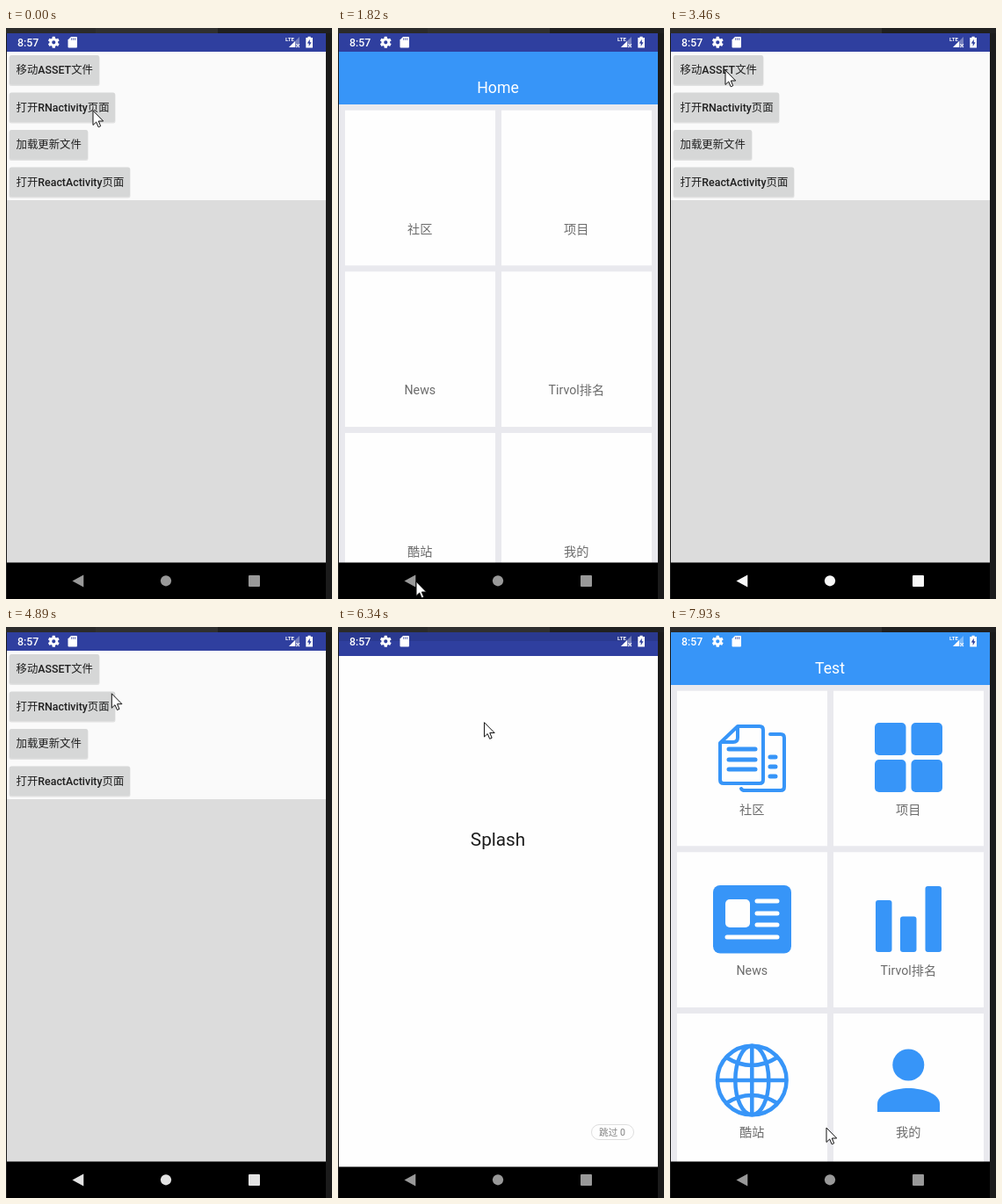
An HTML page with a canvas for the animation above (8000 ms loop, 371x650 px).

```html
<!DOCTYPE html>
<html lang="zh">
<head>
<meta charset="utf-8">
<title>Phone demo</title>
<style>
html, body { margin: 0; width: 100%; height: 100%; overflow: hidden; background: #1c1c1c; }
canvas { display: block; width: 371px; height: 650px; }
</style>
</head>
<body>
<canvas id="stage"></canvas>
<script>
const W = 371, H = 650, LOOP = 8000;
const BLUE = '#3795f8', INDIGO = '#2f3f9f';
const FONT = 'Roboto, "Noto Sans CJK SC", "Noto Sans CJK", sans-serif';
const canvas = document.getElementById('stage');
const g = canvas.getContext('2d');
const ratio = window.devicePixelRatio || 1;
canvas.width = W * ratio;
canvas.height = H * ratio;

const TICKS = [0, 120, 270, 390, 510, 660, 780, 910, 1060, 1180, 1300, 1420, 1540, 1690, 1820,
  2400, 2520, 2640, 2790, 2940, 3070, 3220, 3340, 3460, 3870, 3990, 4110, 4500, 4620, 4770,
  4890, 5020, 5140, 5290, 5560, 5710, 5830, 5950, 6100, 6220, 6340, 6490, 6620, 6770, 6890,
  7020, 7170, 7300, 7450, 7570, 7690, 7810, 7930];

// Each row: time, then values; linear between rows.
const POINTER = [[0, 99, 94], [270, 108, 101], [390, 165, 160], [510, 230, 240], [660, 233, 274],
  [1060, 233, 274], [1180, 225, 330], [1300, 190, 430], [1420, 140, 530], [1540, 108, 592],
  [1690, 93, 626], [1820, 89, 630], [2640, 89, 630], [2790, 92, 609], [2940, 125, 330],
  [3070, 136, 115], [3220, 100, 85], [3340, 72, 58], [3460, 63, 48], [4110, 63, 48],
  [4500, 85, 52], [4620, 124, 59], [4770, 128, 68], [5020, 112, 84], [5140, 104, 87],
  [5290, 100, 90], [5830, 100, 90], [5950, 135, 91], [6100, 156, 87], [6490, 173, 122],
  [6620, 173, 122], [6890, 210, 185], [7020, 230, 224], [7170, 235, 221], [7300, 235, 232],
  [7570, 215, 360], [7810, 183, 535], [7930, 178, 570]];
const NAV_LIGHT = [[2399, 153], [2400, 255], [4770, 240], [5560, 153]];
const NAV_RIPPLE = [[2399, 0], [2400, .22], [2640, .12], [2790, 0]];
const PRESS = [
  [[3860, 0], [3870, .07], [3990, .1], [4110, 0]],
  [[0, 0], [120, .08], [270, .1], [390, .05], [510, 0], [5700, 0], [5710, .08], [5830, .1], [5950, 0]]
];

// Window motion rows: time, shift of lower page, shift of upper page, top of its clip.
const OPEN_A = [[660, -7, 13, 87], [780, -13, 4, 7], [910, -13, 0, 6]];
const CLOSE = [[2520, -13, 0, 6], [2640, -12, 6, 50], [2790, -4, 24, 560], [2940, -1, 26, H], [3070, 0, 26, H]];
const OPEN_B = [[6100, 0, 26, 640], [6220, -5, 18, 240], [6340, -11, 6, 16], [6490, -13, 1, 6], [6620, -13, 0, 6]];

function at(rows, t) {
  if (t <= rows[0][0]) return rows[0].slice(1);
  for (let i = 1; i < rows.length; i++) {
    if (t > rows[i][0]) continue;
    const a = rows[i - 1], b = rows[i], k = (t - a[0]) / (b[0] - a[0]);
    return a.slice(1).map((v, j) => v + (b[j + 1] - v) * k);
  }
  return rows[rows.length - 1].slice(1);
}

function rect(x1, y1, x2, y2, fill, r = 0) {
  g.fillStyle = fill;
  g.beginPath();
  g.roundRect(x1, y1, x2 - x1, y2 - y1, r);
  g.fill();
}
function disc(x, y, r, fill) {
  g.fillStyle = fill;
  g.beginPath();
  g.arc(x, y, r, 0, 7);
  g.fill();
}
function shape(d, fill) {
  g.fillStyle = fill;
  g.fill(new Path2D(d));
}
function line(d, color, width) {
  g.strokeStyle = color;
  g.lineWidth = width;
  g.lineCap = g.lineJoin = 'round';
  g.stroke(new Path2D(d));
}
// y is the middle of the capitals
function text(s, x, y, size, color, align = 'center', weight = 400) {
  g.font = `${weight} ${size}px ${FONT}`;
  g.fillStyle = color;
  g.textAlign = align;
  g.fillText(s, x, y + size * .355);
}

const BUTTONS = [['移动ASSET文件', 106], ['打开RNactivity页面', 124], ['加载更新文件', 93], ['打开ReactActivity页面', 141]];

function button([label, right], i, t) {
  const y = 31 + i * 42.5;
  const press = PRESS[i] ? at(PRESS[i], t)[0] : 0;
  rect(3.5, y + .5, right + .5, y + 35, 'rgba(0,0,0,.1)', 2.5);
  rect(4, y, right, y + 33.5, '#d6d7d7', 2);
  if (press > 0) rect(4, y, right, y + 33.5, `rgba(0,0,0,${press})`, 2);
  let x = 11.5;
  for (const run of label.match(/[A-Za-z]+|[^A-Za-z]+/g)) {
    text(run, x, y + 17, 12.4, '#1f1f1f', 'left', /[A-Z]/i.test(run) ? 500 : 400);
    x += g.measureText(run).width;
  }
}

function home(t) {
  rect(1, 6, 364, 27, INDIGO);
  rect(1, 27, 364, 196, '#fafafa');
  rect(1, 196, 364, 609, '#dcdcdc');
  BUTTONS.forEach((b, i) => button(b, i, t));
}

function splash() {
  rect(1, 6, 364, 27, INDIGO);
  rect(1, 27, 364, 609, '#fefefe');
  text('Splash', 182, 236, 20.7, '#1c1c1c');
  g.strokeStyle = '#dedede';
  g.lineWidth = 1;
  g.beginPath();
  g.roundRect(288.5, 560.5, 48, 17, 8.5);
  g.stroke();
  text('跳过 0', 312, 569, 10.6, '#808080');
}

const ICONS = [
  () => {
    line('M57 132L77 113H102Q106 113 106 117V174Q106 178 102 178H61Q57 178 57 174ZM77 114V126Q77 131 72 131H58', BLUE, 4);
    line('M67 139H97M67 151H97M67 162H97M114 148H120M114 159H120M114 170H120', BLUE, 5);
    line('M114 122H126Q130 122 130 126V182Q130 186 126 186H85Q82 186 81 184', BLUE, 4);
  },
  () => {
    for (const x of [233, 274.5]) for (const y of [109, 151]) rect(x, y, x + 35.5, y + 37, BLUE, 5);
  },
  () => {
    rect(49, 294, 138, 371.5, BLUE, 8);
    rect(63, 310, 91, 342, '#fefefe', 5);
    line('M99 312H122M99 326H122M99 339H122M65 353H122', '#fefefe', 5);
  },
  () => {
    for (const [x, y] of [[234, 311], [262, 329.5], [290.5, 295]]) rect(x, y, x + 18.5, 370, BLUE, 3);
  },
  () => {
    g.strokeStyle = BLUE;
    g.lineWidth = 4.5;
    for (const rx of [39.3, 19]) {
      g.beginPath();
      g.ellipse(93.3, 516, rx, 39.3, 0, 0, 7);
      g.stroke();
    }
    line('M93.3 477V555M54 516H132M64 490Q93 508 122 490M64 542Q93 524 122 542', BLUE, 4.5);
  },
  () => {
    disc(271.3, 498.5, 18, BLUE);
    shape('M236 552V543C236 531 256 525 271.5 525S307 531 307 543V552Z', BLUE);
  }
];
const LABELS = ['社区', '项目', 'News', 'Tirvol排名', '酷站', '我的'];

function grid(top, title, icons) {
  rect(1, 6, 364, 27, INDIGO);
  rect(1, top, 364, 609, '#e9e9ee');
  rect(1, top, 364, top + 60, BLUE);
  text(title, 182, top + 41, 17.7, '#fff');
  LABELS.forEach((label, i) => {
    const x = i % 2 ? 186 : 8, y = top + 66.7 + (i >> 1) * 183.6;
    rect(x, y, x + 171, y + 176.6, '#fefefe');
    text(label, x + 85.3, y + 134.8, 14.2, '#6c6c6c');
  });
  if (icons) ICONS.forEach(draw => draw());
}
const homeGrid = () => grid(27, 'Home', false);
const testGrid = t => grid(6, 'Test', t >= 7450);

// start, lower page, upper page, motion
const SCENES = [
  [0, home], [660, home, splash, OPEN_A], [1060, homeGrid], [2520, home, homeGrid, CLOSE],
  [3070, home], [6100, home, splash, OPEN_B], [7300, testGrid]
];

function page(draw, t, shift, clip) {
  g.save();
  g.beginPath();
  g.rect(1, clip, 363, H - clip);
  g.clip();
  g.translate(0, shift);
  draw(t);
  rect(1, 608.5, 364, 700, '#000');
  g.restore();
}

function statusIcons() {
  const w = '#fff';
  text('8:57', 13, 16.7, 12.4, w, 'left', 500);
  g.save();
  g.translate(54.3, 16.3);
  for (let i = 0; i < 6; i++) {
    rect(-1.7, -6.5, 1.7, -3, w, .6);
    g.rotate(Math.PI / 3);
  }
  g.strokeStyle = w;
  g.lineWidth = 2.8;
  g.beginPath();
  g.arc(0, 0, 3.5, 0, 7);
  g.stroke();
  g.restore();
  shape('M74 10H80Q81 10 81 11V21.5Q81 22.5 80 22.5H71.5Q70.5 22.5 70.5 21.5V13.5Z', w);
  line('M74.7 11.7V13.5M76.7 11.7V13.5M78.7 11.7V13.5', INDIGO, .8);
  text('LTE', 318, 13, 6.2, w, 'left', 700);
  shape('M334 10V22H322Z', 'rgba(255,255,255,.35)');
  shape('M329 15V22H322Z', w);
  line('M330.7 18.7L333.7 21.7M333.7 18.7L330.7 21.7', w, 1.1);
  shape('M343.5 9.7H346.7V11H349V22.5H341.3V11H343.5Z', w);
  shape('M345.8 12.7L342.8 17.4H344.7V21L347.6 16.2H345.8Z', INDIGO);
}

function navIcons(t) {
  const ripple = at(NAV_RIPPLE, t)[0];
  if (ripple > 0) rect(48, 609, 116, 650, `rgba(255,255,255,${ripple})`, 20);
  const v = Math.round(at(NAV_LIGHT, t)[0]), color = `rgb(${v},${v},${v})`;
  shape('M75.5 629.5L88.3 622.5V636.5Z', color);
  disc(182, 629.3, 6.1, color);
  rect(276, 623, 289, 636, color, 1);
}

function pointer(t) {
  const [x, y] = at(POINTER, t);
  g.save();
  g.translate(x, y);
  const d = 'M0 .5V16.5L3.7 13L6.2 18.8L8.7 17.7L6.3 12H11.3Z';
  shape(d, '#fff');
  line(d, '#111', 1);
  g.restore();
}

function render(time) {
  const t = TICKS.filter(v => v <= time).pop();
  g.setTransform(ratio, 0, 0, ratio, 0, 0);
  rect(0, 0, W, H, '#1b1b1b');
  rect(0, 0, 102, 6, '#2b2b2b');
  rect(102, 0, 241, 6, '#303030');
  rect(241, 0, W, 6, '#202020');
  rect(1, 6, 364, H, '#000');
  const [, under, over, motion] = SCENES.filter(s => s[0] <= t).pop();
  if (over) {
    const [low, high, clip] = at(motion, t);
    page(under, t, low, 6);
    rect(1, 6, 364, 608.5 + low, `rgba(0,0,0,${.1 * Math.min(1, -low / 7)})`);
    page(over, t, high, clip);
  } else {
    page(under, t, 0, 6);
  }
  statusIcons();
  navIcons(t);
  pointer(t);
}

const start = performance.now();
function loop(now) {
  render(Math.max(0, now - start) % LOOP);
  requestAnimationFrame(loop);
}
render(0);
requestAnimationFrame(loop);
</script>
</body>
</html>
```
